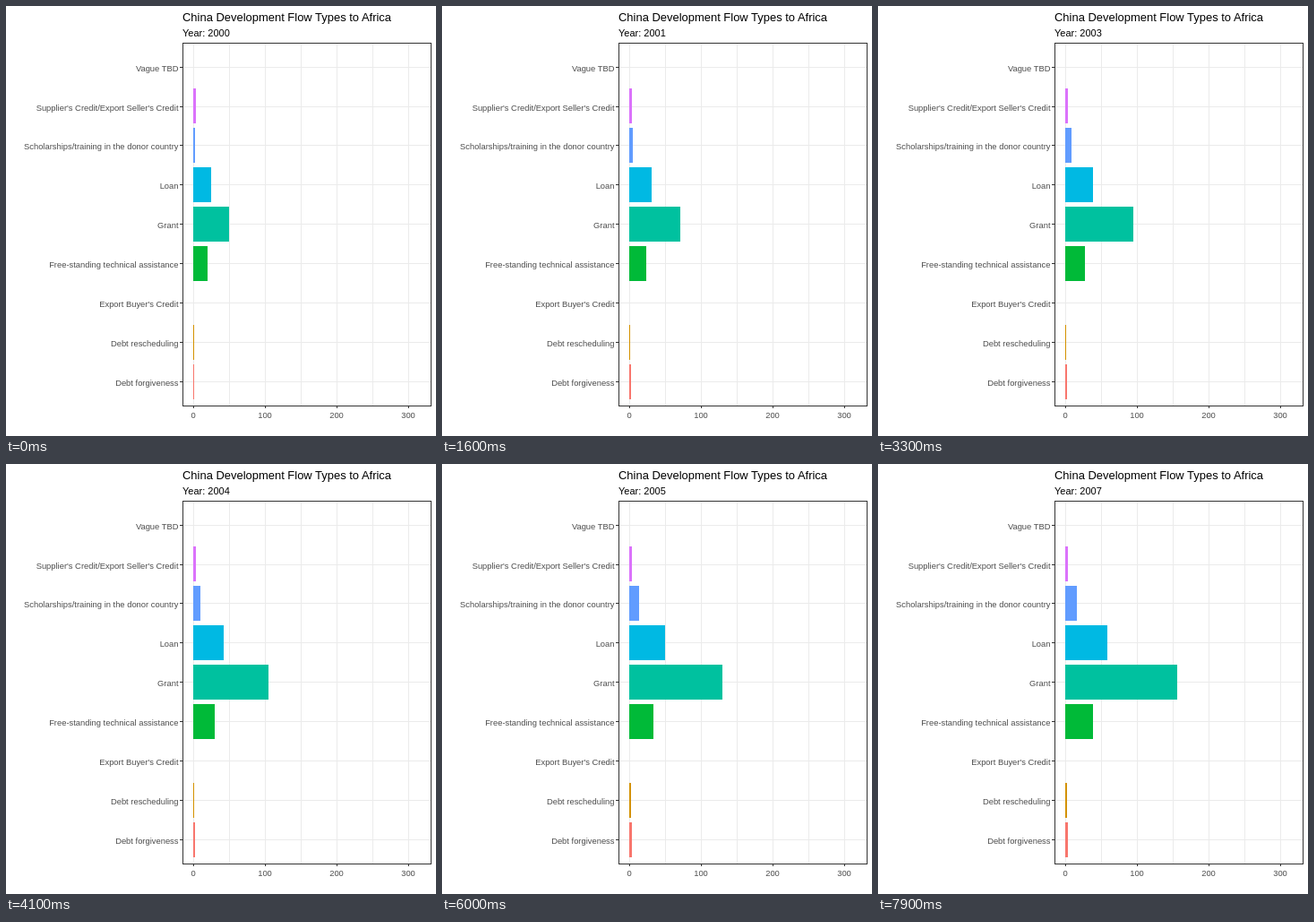
These frames come from a looping animation (480 px wide and 480 px high, 8 s). An HTML page:

```html
<!DOCTYPE html>
<html lang="en">
<head>
<meta charset="utf-8">
<title>Flow types by year</title>
<style>
  html, body { margin: 0; width: 100%; height: 100%; overflow: hidden; background: #fff; }
  svg { display: block; width: 480px; height: 480px; font: 9.4px "Liberation Sans", Arial, sans-serif; fill: #4d4d4d; }
  .head { fill: #000; }
</style>
</head>
<body>
<svg id="chart" viewBox="0 0 480 480"></svg>
<script>
const chart = document.getElementById('chart');
const STEP = 100, STEPS = 80, ZERO = 209;

function add(tag, attrs, text = '') {
  const el = document.createElementNS('http://www.w3.org/2000/svg', tag);
  for (const key in attrs) el.setAttribute(key, attrs[key]);
  el.textContent = text;
  return chart.appendChild(el);
}
const box = (x, y, width, height, fill) => add('rect', { x, y, width, height, fill });
const label = (x, y, text, anchor, attrs) => add('text', { x, y, 'text-anchor': anchor, ...attrs }, text);
const rowY = i => Math.floor(68.2 + 43.87 * i);

// Each row: label, bar colour, first width and growth per step in px
const rows = [
  ['Vague TBD'],
  ["Supplier's Credit/Export Seller's Credit", '#db72fb', 3, 0],
  ['Scholarships/training in the donor country', '#619cff', 2.25, 0.14],
  ['Loan', '#00b9e3', 19.7, 0.342],
  ['Grant', '#00c19f', 40.44, 1.0643],
  ['Free-standing technical assistance', '#00ba38', 15.8, 0.19],
  ["Export Buyer's Credit"],
  ['Debt rescheduling', '#d39200', 1, 0.0104],
  ['Debt forgiveness', '#f8766d', 1.167, 0.0278]
];

for (let x = ZERO; x < 474; x += 40) box(x, 42, 1, 404, '#ebebeb');
rows.forEach((row, i) => box(198, rowY(i), 276, 1, '#ebebeb'));

const bars = [];
rows.forEach(([name, color, first, growth], i) => {
  box(194, rowY(i), 3, 1, '#333');
  label(192.5, rowY(i) + 4.5, name, 'end');
  if (color) bars.push({ el: box(ZERO, 48 + 44 * i, 0, 39, color), first, growth });
});

add('rect', { x: 197.5, y: 41.5, width: 277, height: 405, fill: 'none', stroke: '#333' });
for (let v = 0; v <= 300; v += 100) {
  const x = ZERO + v * 0.8;
  box(x, 447, 1, 2, '#333');
  label(x, 460, v, 'middle');
}
label(197, 17, 'China Development Flow Types to Africa', 'start', { class: 'head', 'font-size': 12.96 });
const year = label(197, 34, '', 'start', { class: 'head', 'font-size': 11 });

function draw(now) {
  const n = Math.floor(now / STEP) % STEPS;
  for (const { el, first, growth } of bars) el.setAttribute('width', Math.round(first + growth * n));
  year.textContent = 'Year: ' + Math.round(2000 + n * 0.0858);
}

const start = performance.now();
function tick() {
  draw(performance.now() - start);
  requestAnimationFrame(tick);
}
tick();
</script>
</body>
</html>
```
